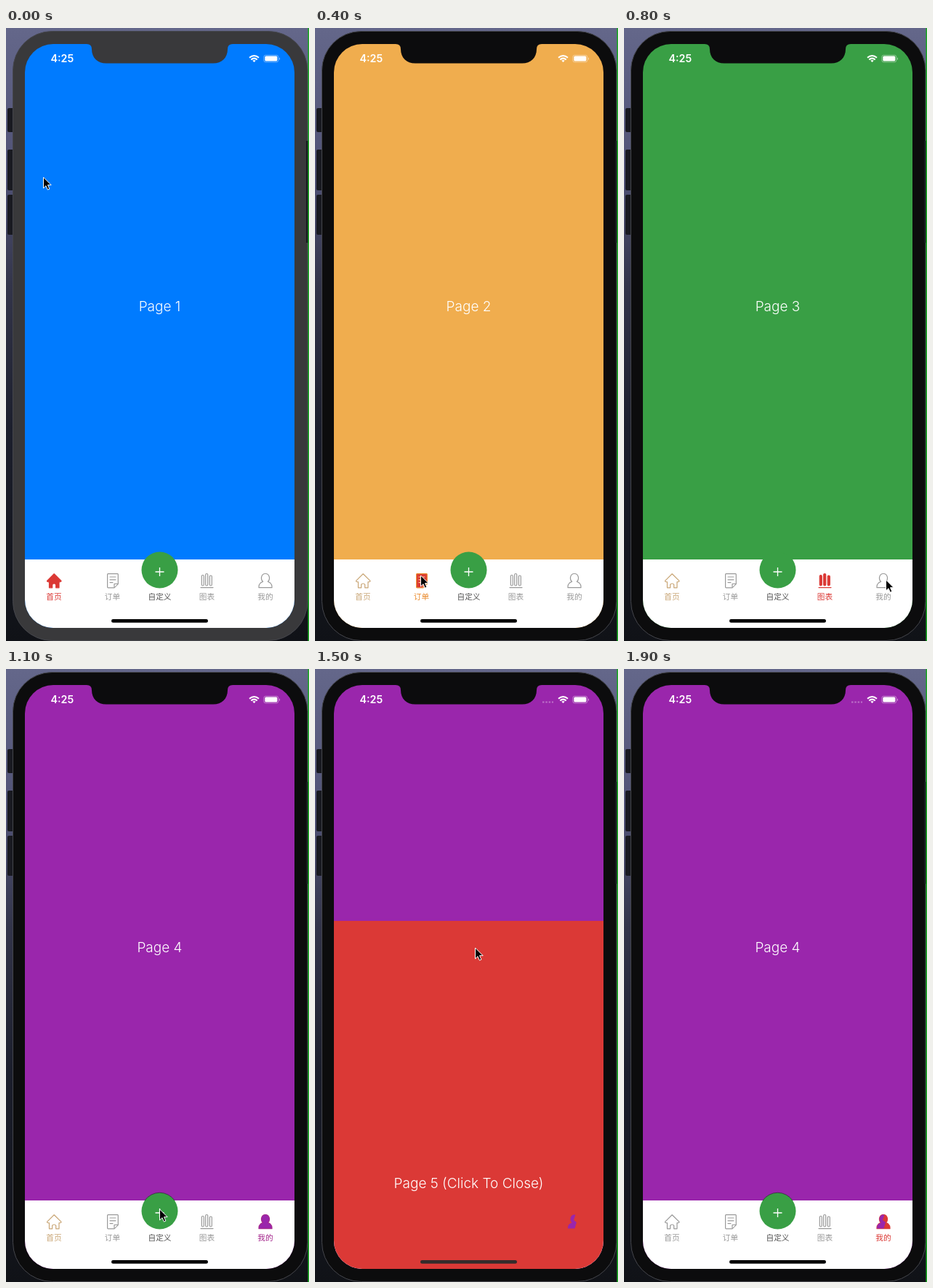
Animation, 417 px wide and 842 px high, one loop 2 s. Source, as an HTML page:

```html
<!DOCTYPE html>
<html lang="zh">
<head>
<meta charset="utf-8">
<title>Tab bar</title>
<style>
  html, body { margin: 0; width: 100%; height: 100%; overflow: hidden; background: #15171f; }
  svg { display: block; width: 100%; height: 100%; }

  /* every state holds until the next keyframe */
  .a { animation: 2s step-end infinite; }
  .bezel { fill: #0c0c0d; animation-name: bezel; }
  .page { animation-name: page; }
  .p1 { animation-name: p1; }
  .p2 { animation-name: p2; }
  .p3 { animation-name: p3; }
  .p4 { animation-name: p4; }
  .late { animation-name: late; }
  .home { animation-name: home; }
  .order { animation-name: order; }
  .lines { animation-name: lines; }
  .chart { animation-name: chart; }
  .mine { animation-name: mine; }
  .modal { animation-name: modal; }
  .bar { animation-name: bar; }
  .cursor { animation-name: cursor; }

  .title { font: 300 19px Inter, sans-serif; fill: #fff; text-anchor: middle; }
  .clock { font: 600 14.3px Inter, sans-serif; fill: #fff; }
  .label { font: 10.7px "Noto Sans CJK SC", "Noto Sans CJK", sans-serif; text-anchor: middle; fill: currentColor; stroke: none; }
  .tab { color: #999; fill: #fff; stroke: currentColor; stroke-width: 1.2; stroke-linejoin: round; stroke-linecap: round; }

  @keyframes bezel { 0% { fill: #39393b } 5%, 100% { fill: #0c0c0d } }
  @keyframes page {
    0% { fill: #007bff } 20% { fill: #f0ad4e } 35% { fill: #399f45 } 45%, 100% { fill: #9a26ac }
  }
  @keyframes p1 { 0% { visibility: visible } 20%, 100% { visibility: hidden } }
  @keyframes p2 { 0% { visibility: hidden } 20% { visibility: visible } 35%, 100% { visibility: hidden } }
  @keyframes p3 { 0% { visibility: hidden } 35% { visibility: visible } 45%, 100% { visibility: hidden } }
  @keyframes p4 { 0% { visibility: hidden } 45%, 100% { visibility: visible } }
  @keyframes late { 0% { visibility: hidden } 65%, 100% { visibility: visible } }
  @keyframes home {
    0% { color: #db3935; fill: #db3935 } 20% { color: #c9a676; fill: #fff } 65%, 100% { color: #999; fill: #fff }
  }
  @keyframes order {
    0% { color: #999; fill: #fff } 20% { color: #ea8a2c; fill: #db3935 } 35%, 100% { color: #999; fill: #fff }
  }
  @keyframes lines { 0% { stroke: #999 } 20% { stroke: #f8d79a } 35%, 100% { stroke: #999 } }
  @keyframes chart {
    0% { color: #999; fill: #fff } 35% { color: #db3935; fill: #db3935 } 45%, 100% { color: #999; fill: #fff }
  }
  @keyframes mine {
    0% { color: #999; fill: #fff } 45% { color: #a4268c; fill: #9a26ac } 65%, 100% { color: #db3935; fill: #db3935 }
  }
  @keyframes modal {
    0% { transform: translateY(802px) } 65% { transform: translateY(0) }
    75% { transform: translateY(324px) } 80%, 100% { transform: translateY(802px) }
  }
  @keyframes bar { 0% { fill: #000 } 65% { fill: #352b2b } 80%, 100% { fill: #000 } }
  @keyframes cursor {
    0% { transform: translate(51px, 205px) }
    5% { transform: translate(66px, 330px) }
    10% { transform: translate(120px, 630px) }
    15% { transform: translate(145px, 752px) }
    25% { transform: translate(210px, 757px) }
    30% { transform: translate(272px, 760px) }
    40% { transform: translate(360px, 758px) }
    50% { transform: translate(300px, 752px) }
    55% { transform: translate(211px, 742px) }
    70% { transform: translate(220px, 383px) }
    90%, 100% { transform: translate(-40px, 205px) }
  }
</style>
</head>
<body>
<svg viewBox="0 0 417 842" preserveAspectRatio="none">
  <defs>
    <linearGradient id="wall" x2="0" y2="1">
      <stop offset="0" stop-color="#64678a"/>
      <stop offset=".25" stop-color="#4f5174"/>
      <stop offset=".42" stop-color="#33354a"/>
      <stop offset=".65" stop-color="#1c1f2d"/>
      <stop offset="1" stop-color="#101217"/>
    </linearGradient>
    <clipPath id="screen"><rect x="26" y="22" width="371" height="802" rx="39"/></clipPath>
    <clipPath id="left"><path d="M346 748H359L356 757 360 760 357 770H346Z"/></clipPath>
    <path id="person" d="M353.6 760.4C349 762 347.8 765 348 768.6H366C366.200 765 365 762 360.400 760.400C364 757.500 363 749.500 357 749.500S350 757.500 353.600 760.400Z"/>
  </defs>

  <rect width="417" height="842" fill="url(#wall)"/>
  <g fill="#191a21">
    <rect x="2" y="110" width="9" height="33" rx="2"/>
    <rect x="2" y="167" width="9" height="56" rx="2"/>
    <rect x="2" y="229" width="9" height="55" rx="2"/>
  </g>
  <rect class="a bezel" x="9.500" y="4.500" width="405.500" height="837" rx="54" stroke="#45464c"/>
  <rect x="413" y="155" width="3" height="140" fill="#191a21"/>
  <rect x="415.500" width="1.500" height="842" fill="#16a81e"/>

  <g clip-path="url(#screen)">
    <rect class="a page" x="26" y="22" width="371" height="802"/>
    <g class="title">
      <text class="a p1" x="211.500" y="389">Page 1</text>
      <text class="a p2" x="211.500" y="389">Page 2</text>
      <text class="a p3" x="211.500" y="389">Page 3</text>
      <text class="a p4" x="211.500" y="389">Page 4</text>
    </g>

    <rect x="26" y="730" width="371" height="94" fill="#fff"/>
    <g class="tab a home">
      <path d="M66.200 749.800 56.500 759.400Q56.500 761 59.500 760.800V768.800H63.700V764.500Q66.200 761.500 68.700 764.500V768.800H73V760.800Q76 761 76 759.400Z"/>
      <text class="label" x="66" y="785">首页</text>
    </g>
    <g class="tab a order">
      <path d="M140.500 749.600H153.500Q154.300 749.600 154.300 750.500V763.500L149 768.800H140.500Q139.600 768.800 139.600 768V750.500Q139.600 749.600 140.500 749.600Z"/>
      <path class="a lines" d="M143 754H151M143 757.800H151M143 761.600H147M149 768V763.500H153.700" stroke="#999"/>
      <text class="label" x="146.500" y="785">订单</text>
    </g>
    <g class="tab a chart">
      <rect x="269.300" y="751.500" width="3" height="14.500" rx="1.500"/>
      <rect x="274.700" y="749.500" width="3" height="16.500" rx="1.500"/>
      <rect x="280.300" y="752" width="3" height="14" rx="1.500"/>
      <path d="M268 768.600H285"/>
      <text class="label" x="276.500" y="785">图表</text>
    </g>
    <g class="tab a mine">
      <use href="#person"/>
      <text class="label" x="357" y="785">我的</text>
    </g>

    <circle cx="211.500" cy="744.500" r="25" fill="#399f45"/>
    <path class="a p4" d="M191 730A25 25 0 0 1 232 730" fill="none" stroke="#2b3a35" stroke-width=".8"/>
    <path d="M205.500 747H217.500M211.500 741V753" stroke="#fff" stroke-width="1.300"/>
    <text class="label" x="211.500" y="785" color="#555">自定义</text>

    <g class="a modal">
      <rect x="26" y="22" width="371" height="802" fill="#db3936"/>
      <text class="title" x="211.500" y="389">Page 5 (Click To Close)</text>
    </g>
    <use class="a late" href="#person" clip-path="url(#left)" fill="#9a26ac"/>
    <rect class="a bar" x="145" y="812" width="133" height="4.800" rx="2.400"/>
  </g>

  <path class="a bezel" d="M111 21V22Q118 22 118 29C118 41 126 48.500 138 48.500H285C297 48.500 305 41 305 29Q305 22 312 22V21Z"/>

  <text class="clock" x="61.500" y="47">4:25</text>
  <path class="a late" d="M313 45.500H328" stroke="#fff" stroke-opacity=".35" stroke-width="1.800" stroke-dasharray="2.500 1.800"/>
  <g fill="none" stroke="#fff" stroke-width="2">
    <path d="M335 40.800Q341.500 35.200 348 40.800M337.300 43.500Q341.500 39.800 345.700 43.500"/>
    <path d="M341.500 47 339.300 44.800Q341.500 43.200 343.700 44.800Z" fill="#fff" stroke="none"/>
    <rect x="354.800" y="37.300" width="20" height="9.600" rx="2.600" stroke-width=".9" stroke-opacity=".45"/>
    <rect x="356.300" y="38.600" width="17" height="7" rx="1.500" fill="#fff" stroke="none"/>
    <path d="M376.500 40.800V43.600" stroke-width="1" stroke-opacity=".5"/>
  </g>

  <path class="a cursor" d="M.5 0V15L4 11.700 6.400 17.200 8.900 16.100 6.500 10.700H11.200Z" fill="#000" stroke="#fff" stroke-width="1"/>
</svg>
</body>
</html>
```
